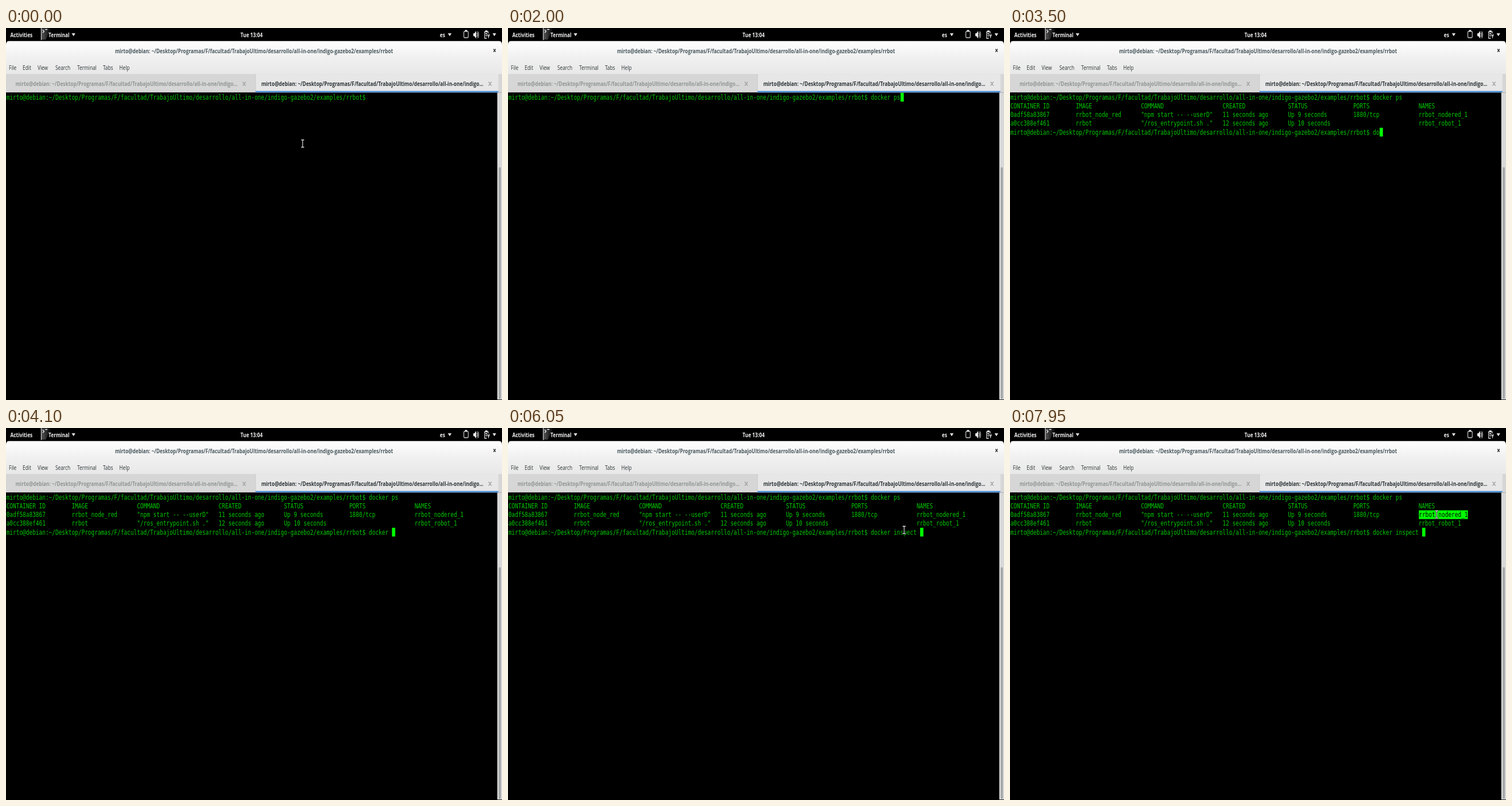
Animation, 864 px wide and 648 px high, one loop 8 s. Source, as an HTML page:

```html
<!DOCTYPE html>
<html lang="en">
<head>
<meta charset="utf-8">
<title>Terminal session</title>
<style>
html, body { margin: 0; width: 100%; height: 100%; overflow: hidden; background: #000; }
:where(div, span, svg, pre) { position: absolute; left: 0; top: 0; }
/* A 1366 x 768 desktop shown at 864 x 648 */
#screen {
  width: 1366px; height: 768px; overflow: hidden; background: #000;
  transform: scale(calc(864 / 1366), .84375); transform-origin: 0 0;
  font: 13.15px/20px "Open Sans", "Noto Sans", sans-serif; color: #2e3436; white-space: nowrap;
}
#bar { width: 1366px; height: 27px; font-weight: 700; color: #eee; }
#bar span { top: 4px; }
#head { top: 27px; width: 1366px; height: 69px; border-radius: 7px 7px 0 0;
  background: linear-gradient(#fff, #f1f1f1 45%, #e8e8e8); }
#title { top: 10px; width: 100%; text-align: center; color: #4a595f; font-weight: 700; }
#head span { top: 45px; }
#tabs { top: 95px; width: 1366px; height: 38px; background: #d6d6d6; font-weight: 700; }
#tabs span { top: 10px; }
#active { left: 687px; width: 668px; height: 35px; background: #e7e7e7;
  border-left: 1px solid #bbb; border-bottom: 3px solid #4a90d9; }
#tabs .idle { color: #929595; }
#scroll { left: 1353px; top: 133px; width: 13px; height: 634px; background: #d8d8d8; }
#thumb { left: 4px; top: 154px; width: 6px; height: 479px; border-radius: 3px; background: #a4a7a8; }
#out, #pick { font: 14.95px/18px "DejaVu Sans Mono", monospace; }
#out { margin: 0; left: 1px; top: 134px; color: #00c800; }
#caret { width: 9px; height: 18px; background: #0f0; }
#pick { left: 1126px; top: 170px; width: 135px; height: 18px; background: #0f0; color: #000; }
</style>
</head>
<body>
<div id="screen">
  <div id="bar">
    <svg width="1366" height="27" fill="none" stroke="#eee" stroke-width="1.6">
      <defs><linearGradient id="fade"><stop stop-color="#555"/><stop offset="1" stop-color="#000"/></linearGradient></defs>
      <path d="M98 1h27l-7 8-8 15h-12z" fill="url(#fade)" stroke="none"/>
      <path d="M97 0v25M101 4l4 3-4 3M108 3h6"/>
      <g fill="#eee" stroke="none">
        <path d="M181 11h10l-5 6zM1217 11h10l-5 6zM1340 11h10l-5 6z"/>
        <path d="M1264 4h6v3h-6zM1287 11h3l5-5v16l-5-5h-3z"/>
        <path d="M1320 5h6v3h-6zM1320 11h5v2h-5zM1320 15h5v2h-5z"/>
      </g>
      <rect x="1261" y="7" width="12" height="13" rx="2"/>
      <path d="M1297 10q3 4 0 8M1299 7q5 7 0 14M1328 11V8h-10v13h6M1327 12v4h4v-4M1329 16v5"/>
    </svg>
    <span style="left:12px">Activities</span>
    <span style="left:117px">Terminal</span>
    <span style="left:646px">Tue 13:04</span>
    <span style="left:1195px">es</span>
  </div>
  <div id="head">
    <div id="title"></div>
    <svg style="left:1341px;top:15px" width="9" height="9"><path d="M1.5 1.5l6 6m0-6l-6 6" stroke="#2e3436" stroke-width="2"/></svg>
  </div>
  <div id="tabs">
    <div id="active"></div>
    <span class="tab idle" style="left:26px"></span>
    <span class="tab" style="left:703px"></span>
    <svg width="1366" height="38" fill="none" stroke="#929595" stroke-width="1.6">
      <path d="M652 16l8 8m0-8l-8 8M1329 16l8 8m0-8l-8 8"/>
    </svg>
  </div>
  <div id="scroll"><div id="thumb"></div></div>
  <pre id="out"></pre>
  <div id="caret"></div>
  <div id="pick">rrbot_nodered_1</div>
  <svg id="mouse" width="12" height="19" fill="none">
    <defs><path id="beam" d="M2 2h3l1 1 1-1h3M6 3v13M2 17h3l1-1 1 1h3"/></defs>
    <use href="#beam" stroke="#222" stroke-width="3.6"/>
    <use href="#beam" stroke="#ddd" stroke-width="1.6"/>
  </svg>
</div>
<script>
const $ = id => document.getElementById(id);
const KX = 1366 / 864, KY = 768 / 648, CELL = 9, ROW = 18;

const host = 'mirto@debian:';
const path = '~/Desktop/Programas/F/facultad/TrabajoUltimo/desarrollo/all-in-one/indigo-gazebo2/examples/rrbot';
const prompt = host + path + '$ ';
$('title').textContent = host + ' ' + path;
for (const tab of document.querySelectorAll('.tab'))
  tab.textContent = host + ' ' + path.split('-gazebo2')[0] + '...';

const menu = { File: 8, Edit: 46, View: 87, Search: 136, Terminal: 196, Tabs: 267, Help: 312 };
for (const [name, x] of Object.entries(menu)) {
  const item = document.createElement('span');
  item.textContent = name;
  item.style.left = x + 'px';
  $('head').append(item);
}

const widths = [20, 20, 25, 20, 20, 20, 0];
const table = [
  ['CONTAINER ID', 'IMAGE', 'COMMAND', 'CREATED', 'STATUS', 'PORTS', 'NAMES'],
  ['0adf58a83867', 'rrbot_node_red', '"npm start -- --userD"', '11 seconds ago', 'Up 9 seconds', '1880/tcp', 'rrbot_nodered_1'],
  ['a0cc388ef461', 'rrbot', '"/ros_entrypoint.sh ."', '12 seconds ago', 'Up 10 seconds', '', 'rrbot_robot_1']
].map(row => row.map((cell, i) => cell.padEnd(widths[i])).join(''));

const list = 'docker ps', inspect = 'docker inspect ';
// Key presses: the first command, Enter, then the second command
const keys = [550, 900, 1000, 1150, 1250, 1350, 1500, 1700, 1900, 2050,
  2850, 3200, 3650, 3750, 3850, 3950, 4050, 4250, 4400, 4500, 4700, 5100, 5200, 5350, 5500];

// Pointer: time, x, y in stage pixels; hidden while typing
const track = [[0, 517, 201], [2550, 517, 201], [2640, 518, 201], [5800, 560, 194], [5900, 640, 188],
  [6050, 690, 178], [6300, 735, 165], [6550, 749, 157], [7150, 749, 157], [7350, 743, 151], [8000, 743, 151]];

function pointer(t) {
  const i = track.findIndex(p => p[0] > t);
  const [t0, x0, y0] = track[i - 1], [t1, x1, y1] = track[i];
  const k = (t - t0) / (t1 - t0);
  return [x0 + (x1 - x0) * k, y0 + (y1 - y0) * k];
}

const show = (el, on) => el.style.visibility = on ? 'visible' : 'hidden';
const place = (el, x, y) => { el.style.left = x + 'px'; el.style.top = y + 'px'; };

function draw() {
  const t = performance.now() % 8000;
  const n = keys.filter(k => k <= t).length;
  const done = n > list.length;
  const typed = done ? inspect.slice(0, n - list.length - 1) : list.slice(0, n);
  const lines = done ? [prompt + list, ...table, prompt + typed] : [prompt + typed];
  const text = lines.join('\n');
  if ($('out').textContent !== text) $('out').textContent = text;

  // The caret blinks anew after each key
  const lastKey = n ? keys[n - 1] : -950;
  show($('caret'), (t - lastKey) % 1200 < 600);
  place($('caret'), 1 + (prompt + typed).length * CELL, 134 + (lines.length - 1) * ROW);
  show($('pick'), t >= 7550);

  const [x, y] = pointer(t);
  show($('mouse'), t < 550 || (t >= 2550 && t < 2850) || t >= 5800);
  place($('mouse'), x * KX - 6, y * KY - 9.5);
  requestAnimationFrame(draw);
}
draw();
</script>
</body>
</html>
```
